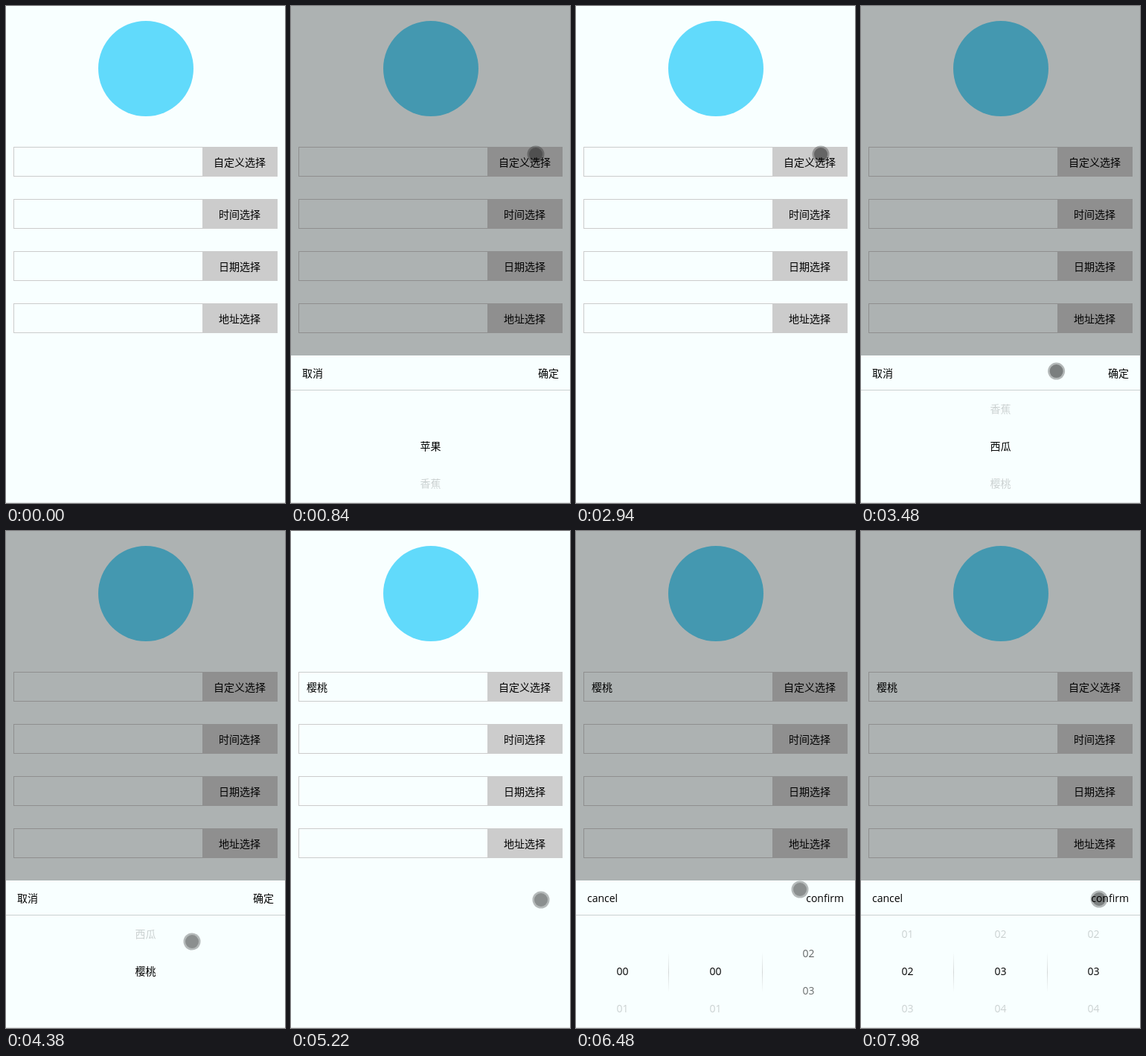
Write an HTML page that moves like this. It is 375 px wide and 667 px high and loops after 8000 ms.

```html
<!DOCTYPE html>
<html lang="zh">
<head>
<meta charset="utf-8">
<title>Picker demo</title>
<style>
  html, body { margin: 0; width: 100%; height: 100%; overflow: hidden; background: #f8ffff; }
  svg { display: block; width: 375px; height: 667px; }
  text { font: 14px "Open Sans", "Noto Sans CJK SC", "Noto Sans CJK", sans-serif; fill: #000; }
</style>
</head>
<body>
<svg viewBox="0 0 375 667" xmlns="http://www.w3.org/2000/svg">
  <defs>
    <clipPath id="window"><rect y="516" width="375" height="150"/></clipPath>
    <linearGradient id="fade" x1="0" y1="0" x2="0" y2="1">
      <stop offset="0" stop-color="#d5d9d9" stop-opacity="0"/>
      <stop offset=".5" stop-color="#d5d9d9"/>
      <stop offset="1" stop-color="#d5d9d9" stop-opacity="0"/>
    </linearGradient>
  </defs>
  <rect width="375" height="667" fill="#f8ffff"/>
  <circle cx="188" cy="84" r="64" fill="#61dafb"/>
  <g id="form"></g>
  <rect id="mask" width="375" height="667" opacity=".3"/>
  <g id="labels"></g>
  <g id="sheet">
    <rect y="469" width="375" height="198" fill="#f8ffff"/>
    <rect y="515" width="375" height="1" fill="#ccd1d1"/>
    <text id="no" x="15" y="498"></text>
    <text id="yes" x="360" y="498" text-anchor="end"></text>
    <g id="bars">
      <rect x="124" y="565" width="1" height="54" fill="url(#fade)"/>
      <rect x="250" y="565" width="1" height="54" fill="url(#fade)"/>
    </g>
    <g id="wheels" clip-path="url(#window)"></g>
  </g>
  <rect y="666" width="375" height="1" fill="#dfe3e3"/>
  <g id="cursor">
    <circle r="11.5"/>
    <circle r="9"/>
  </g>
</svg>
<script>
const LOOP = 8000, STEP = 60, SNAP = 120, ROW = 50, MID = 591;
const $ = id => document.getElementById(id);
const clamp = (v, lo = 0, hi = 1) => Math.min(hi, Math.max(lo, v));
const mix = (a, b, p) => a + (b - a) * p;
const linear = p => p;
const smooth = p => (1 - Math.cos(Math.PI * p)) / 2;
const show = (el, on) => el.setAttribute("visibility", on ? "visible" : "hidden");

function add(parent, tag, attrs, text = "") {
  const el = document.createElementNS("http://www.w3.org/2000/svg", tag);
  for (const k in attrs) el.setAttribute(k, attrs[k]);
  el.textContent = text;
  return parent.appendChild(el);
}

["自定义选择", "时间选择", "日期选择", "地址选择"].forEach((name, i) => {
  const y = 189 + i * 70;
  add($("form"), "rect", { x: 10.5, y: y + .5, width: 254, height: 39, fill: "none", stroke: "#ccc" });
  add($("form"), "rect", { x: 264, y, width: 101, height: 40, fill: "#ccc" });
  add($("labels"), "text", { x: 314, y: y + 26, "text-anchor": "middle" }, name);
});
const value = add($("labels"), "text", { x: 21, y: 215 }, "樱桃");

function wheel(x, items) {
  const g = add($("wheels"), "g", {});
  return { g, drags: [], rows: items.map(s => add(g, "text", { x, "text-anchor": "middle" }, s)) };
}
const digits = Array.from({ length: 24 }, (_, i) => String(i).padStart(2, "0"));
const fruit = wheel(187.5, ["苹果", "香蕉", "西瓜", "樱桃"]);
const [hour, minute, second] = [0, 1, 2].map(i => wheel(62.5 + i * 125, digits));

// Script of the pointer: glides, taps that switch the sheet, drags that turn a wheel
const home = { x: 375, y: 133 };
const moves = [], taps = [];
let pen = home;

function glide(start, end, x, y, ease = smooth) {
  moves.push({ start, end, x, y, ease });
  pen = { x, y };
}
function tap(at, sheet) {
  taps.push({ at, sheet });
}
function drag(start, end, x, y, w, row) {
  w.drags.push({ start, end, from: pen.y, to: y, row });
  glide(start, end, x, y, linear);
}

glide(120, 540, 329, 199);
tap(840, "fruit");
glide(900, 1320, 196, 620);
drag(1320, 1560, 230, 556, fruit, 2);
glide(1680, 2160, 217, 391);
tap(2400, "");
glide(2400, 2940, 329, 199);
tap(3180, "fruit");
glide(3180, 3660, 233, 620);
drag(4020, 4260, 250, 551, fruit, 3);
glide(4380, 5040, 336, 495);
tap(5220, "");
glide(5220, 5700, 320, 282);
tap(5880, "clock");
glide(5880, 6180, 300, 605);
drag(6180, 6480, 301, 481, second, 3);
glide(6540, 6840, 205, 620);
drag(6840, 7080, 215, 493, minute, 3);
glide(7140, 7440, 65, 632);
drag(7440, 7620, 84, 532, hour, 2);
glide(7620, 7980, 320, 494);

const progress = (m, t) => clamp((t - m.start) / (m.end - m.start));

function pointer(t) {
  return moves.reduce((p, m) => {
    const k = m.ease(progress(m, t));
    return { x: mix(p.x, m.x, k), y: mix(p.y, m.y, k) };
  }, home);
}

// A wheel follows the finger, then settles on a row
function offset(w, t) {
  return w.drags.reduce((pos, d) => {
    if (t < d.start) return pos;
    const pulled = clamp(pos + progress(d, t) * (d.from - d.to) / ROW, 0, w.rows.length - 1);
    return mix(pulled, d.row, clamp((t - d.end) / SNAP));
  }, 0);
}

function turn(w, t, on) {
  const pos = offset(w, t);
  show(w.g, on);
  w.rows.forEach((row, i) => {
    const dy = (i - pos) * ROW, d = Math.abs(dy);
    row.setAttribute("y", MID + 5 + dy);
    row.setAttribute("opacity", d <= ROW ? 1 - .82 * d / ROW : .18 * clamp(1 - (d - ROW) / 20));
  });
}

const [ring, core] = $("cursor").children;
const wheels = [fruit, hour, minute, second];

function draw(now) {
  const t = Math.floor(now % LOOP / STEP) * STEP;
  const sheet = taps.reduce((s, p) => t >= p.at ? p.sheet : s, "");
  const clock = sheet === "clock";

  show($("mask"), sheet);
  show($("sheet"), sheet);
  show($("bars"), clock);
  show(value, t >= 5220);
  $("no").textContent = clock ? "cancel" : "取消";
  $("yes").textContent = clock ? "confirm" : "确定";
  wheels.forEach(w => turn(w, t, w === fruit ? sheet === "fruit" : clock));

  const { x, y } = pointer(t);
  const down = taps.some(p => t >= p.at && t < p.at + STEP) ||
    wheels.some(w => w.drags.some(d => t >= d.start && t <= d.end + SNAP));
  show($("cursor"), t >= 180);
  $("cursor").setAttribute("transform", `translate(${x} ${y})`);
  ring.setAttribute("fill-opacity", down ? .27 : .28);
  core.setAttribute("fill-opacity", down ? .23 : .31);
}

const start = performance.now();
function tick() {
  draw(performance.now() - start);
  requestAnimationFrame(tick);
}
tick();
</script>
</body>
</html>
```
